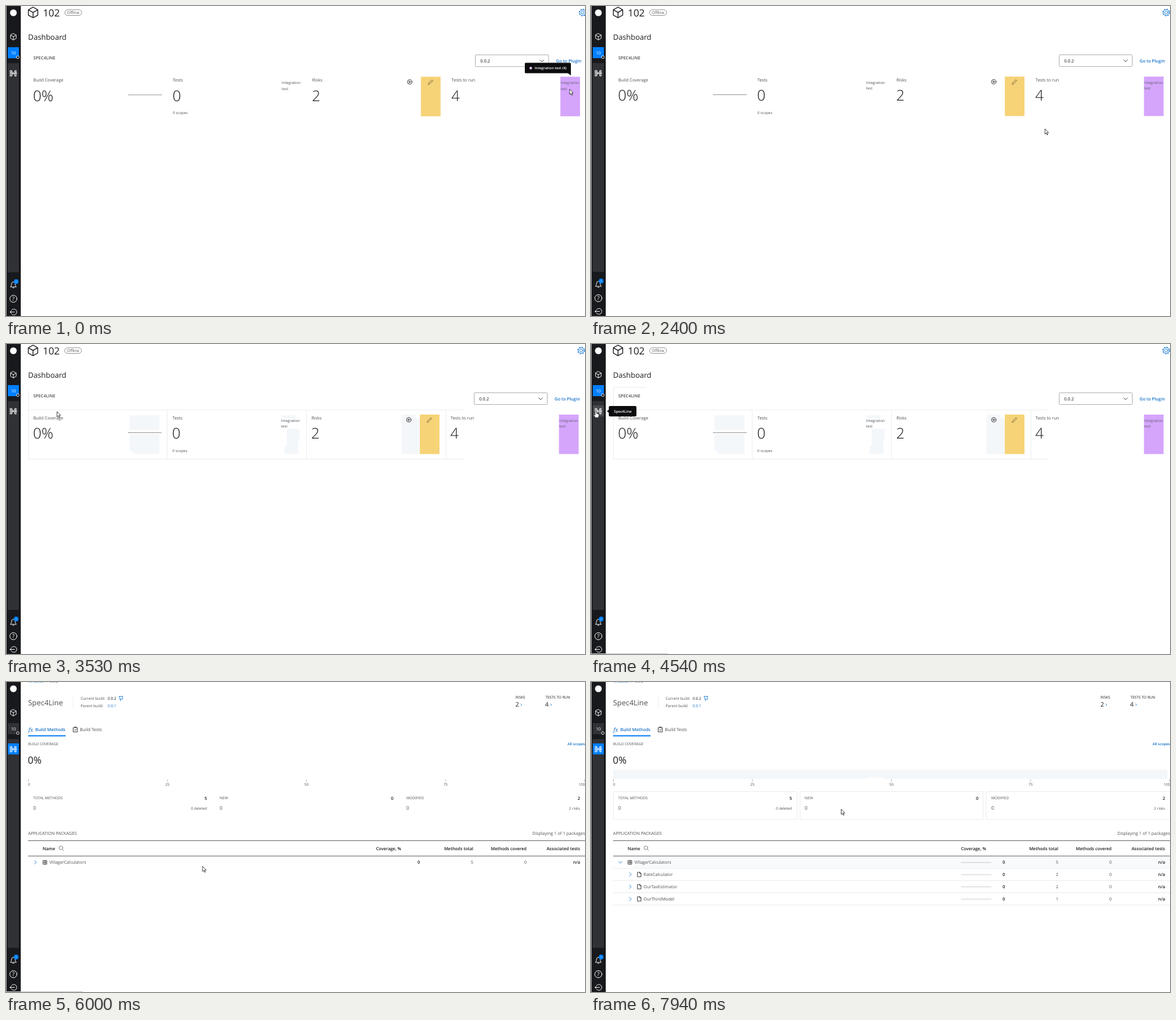
Animation of 943 by 505 pixels, one loop 8000 ms. Source, as an HTML page:

```html
<!DOCTYPE html>
<html lang="en">
<head>
<meta charset="utf-8">
<title>Dashboard</title>
<style>
  html, body { margin: 0; width: 100%; height: 100%; overflow: hidden; background: #fff; }
  svg { display: block; width: 100%; height: 100%; }
  text { font-family: "Open Sans", sans-serif; font-size: 7px; fill: #4c4f54; text-rendering: geometricPrecision; white-space: pre; }
  .small { font-size: 6px; }
  .mid { font-size: 6.2px; }
  .huge { font-size: 24px; font-weight: 300; fill: #1b191b; }
  .dark { fill: #1b191b; }
  .bold { font-weight: 600; }
  .blue { fill: #1570c8; }
  .white { fill: #fff; }
  .end { text-anchor: end; }
  .center { text-anchor: middle; }
  .line { fill: none; stroke: #eceeef; }
  .pale { fill: #f4f7fa; }
  .icon { fill: none; stroke: #fff; stroke-width: .9; stroke-linejoin: round; stroke-linecap: round; }
  .icon.ink { stroke: #2b2c30; }
  .icon.sky { stroke: #1f7fd6; }
</style>
</head>
<body>
<svg viewBox="0 0 943 505" preserveAspectRatio="none">
  <defs>
    <path id="cube" d="M0-5.2L4.6-2.7V2.7L0 5.2L-4.6 2.7V-2.7ZM-4.6-2.7L0 0L4.6-2.7M0 0V5.2"/>
    <path id="file" d="M-2.6-3.6H.8L2.7-1.6V3.6H-2.6ZM.8-3.6V-1.6H2.7"/>
    <g id="arrow"><path d="M0 0V8.6L2 6.8L3.4 10L4.8 9.4L3.4 6.3H6Z" fill="#fff" stroke="#222" stroke-width=".8"/></g>
    <g id="hand"><path d="M-1.2 7V1Q0-.6 1 1V4.2L4.4 5Q5.2 5.4 5 7L4.2 11H-.8L-3.4 7.4Q-3.6 5.8-2.2 6.2Z" fill="#fff" stroke="#222" stroke-width=".8"/></g>
    <g id="beam"><path d="M-1.8-4H1.8M0-4V4M-1.8 4H1.8" fill="none" stroke="#222" stroke-width=".9"/></g>
  </defs>

  <g id="view">
    <rect width="960" height="520" fill="#fff"/>

    <g data-on="0 5430">
      <use href="#cube" class="icon ink" stroke-width=".6" transform="translate(44 10.5) scale(1.65)"/>
      <text class="dark" x="60" y="16.6" style="font-size:16px">102</text>
      <rect x="95.5" y="6" width="27.5" height="9.4" rx="4.7" fill="none" stroke="#777" stroke-width=".8"/>
      <text class="center" x="109.2" y="12.8" style="font-size:6.3px">Offline</text>
      <g class="icon sky" transform="translate(936.8 10.6)">
        <circle r="4.7"/><circle r="2.4"/>
        <circle r="5.5" stroke-width="1.3" stroke-dasharray="2.1 2.22" stroke-linecap="butt"/>
      </g>
      <text class="dark" x="36" y="55" style="font-size:12.1px">Dashboard</text>
      <text class="bold" x="44.5" y="86.7">SPEC4LINE</text>
      <rect x="762.5" y="79.5" width="119" height="19" rx="1" fill="#fff" stroke="#9b9ea3" stroke-width=".8"/>
      <text class="dark" x="770.7" y="91.5">0.0.2</text>
      <path class="icon ink" d="M867.6 87.8l3 3l3-3"/>
      <text class="blue bold" x="893.6" y="91.5">Go to Plugin</text>

      <g data-on="2830 5430">
        <path class="line" d="M36.5 76V187.5H746M36.5 107.5H746M262.5 107.5V187M489.5 107.5V187M716.5 107.5V187"/>
        <path class="pale" d="M201 116H250V140H201ZM201 147H250V179H206V174H201ZM448 116H472V121H448ZM457 138H478V157H476V179H454V166H457ZM644 115H667V121H674V179H644Z"/>
        <path class="line" data-on="3810 5430" d="M36.5 76V70.5H90"/>
      </g>

      <text x="44.5" y="122.8">Build Coverage</text>
      <text class="huge" x="44" y="154.3">0%</text>
      <path d="M199 144.5H253" stroke="#333" stroke-width=".9" stroke-dasharray="1.3 1"/>
      <text x="271" y="122.8">Tests</text>
      <text class="huge" x="270.5" y="154.3">0</text>
      <text class="small" x="271" y="176">0 scopes</text>
      <text class="small" x="448" y="126.6">Integration</text>
      <text class="small" x="448" y="136.4">test</text>
      <text x="497.5" y="122.8">Risks</text>
      <text class="huge" x="497" y="154.3">2</text>
      <g class="icon ink" stroke-width=".7"><circle cx="656" cy="123.5" r="3.7"/><path d="M654.2 123.5h3.6m-1.8-1.8v3.6"/></g>
      <rect x="674" y="115" width="32" height="64.3" fill="#f7d377"/>
      <path class="icon" style="stroke:#665a3b;stroke-width:.8" d="M686 127.5l.6-2.2l5.4-5.3l1.6 1.5l-5.4 5.4Z"/>
      <text x="724" y="122.8">Tests to run</text>
      <text class="huge" x="723.5" y="154.3">4</text>
      <rect x="900.6" y="115" width="32" height="64.3" fill="#d5a5fc"/>
      <text class="small" x="901" y="126.6" fill-opacity=".8">Integration</text>
      <text class="small" x="901" y="136.4" fill-opacity=".8">test</text>
    </g>

    <g data-on="5430 8000">
      <text class="small blue" x="36" y="1">All builds</text>
      <text class="small" x="66" y="1">/  0.0.2</text>
      <text x="36" y="37.8" style="font-size:12px">Spec4Line</text>
      <path class="line" d="M109.5 24V41"/>
      <text class="mid" x="121.6" y="29">Current build:</text>
      <text class="mid dark" x="165.6" y="29">0.0.2</text>
      <path class="icon sky" d="M184.3 23.4h6l-1.4 2.3l1.4 2.3h-4.5M184.3 23.4l2.4 7.4"/>
      <text class="mid" x="121.6" y="41">Parent build:</text>
      <text class="mid blue" x="165.6" y="41">0.0.1</text>
      <text class="small dark" x="830" y="26.8">RISKS</text>
      <text class="dark" x="829.8" y="40.4" style="font-size:10px">2</text>
      <text class="small dark" x="878.6" y="26.8">TESTS TO RUN</text>
      <text class="dark" x="878" y="40.4" style="font-size:10px">4</text>
      <path class="icon sky" d="M838.7 35.6l1.4 1.4l-1.4 1.4M887.2 35.6l1.4 1.4l-1.4 1.4"/>

      <text class="blue" x="36.5" y="80.6" style="font:italic 9px 'Noto Serif',serif">fx</text>
      <text class="blue bold" x="47.8" y="80.3">Build Methods</text>
      <rect x="36" y="86.6" width="61" height="2" fill="#0a7ff0"/>
      <path class="icon ink" stroke-width=".7" d="M109.8 74.3h6.4v7h-6.4ZM111.5 73.3h3M111.4 78l1.2 1.2l2.2-2.6"/>
      <text x="120.3" y="80.3" style="font-size:7.2px">Build Tests</text>
      <text class="small" x="36" y="103">BUILD COVERAGE</text>
      <text class="small blue bold end" x="943" y="103">All scopes</text>
      <text class="dark" x="35.5" y="133" style="font-size:16px">0%</text>
      <path data-on="7660 8000" class="pale" d="M36 143H939V158H478V156H448V158H36Z"/>
      <g id="axis"></g>
      <g data-on="7660 8000" class="line">
        <path d="M36.5 178.5H335.5V224H36.5ZM340.5 178.5H638.5V224H340.5ZM643.5 178.5H943V224H643.5Z"/>
      </g>
      <g id="cards"></g>

      <text x="36" y="248.7">APPLICATION PACKAGES</text>
      <text class="end" x="943" y="248.7">Displaying 1 of 1 packages</text>
      <path d="M36 258.5H943M36 283.5H943" stroke="#55585c" stroke-width=".9"/>
      <g class="dark bold">
        <text class="dark" x="59.7" y="273.5">Name</text>
        <text class="dark" x="602.7" y="273.5">Coverage, %</text>
        <text class="dark end" x="761" y="273.5">Methods total</text>
        <text class="dark end" x="848" y="273.5">Methods covered</text>
        <text class="dark end" x="935" y="273.5">Associated tests</text>
      </g>
      <g class="icon" style="stroke:#777"><circle cx="89.4" cy="270.2" r="3"/><path d="M91.7 272.6l2 2"/></g>
      <rect data-on="7240 8000" x="69" y="287" width="874" height="15.5" fill="#f8fafb"/>
      <g id="rows"></g>
    </g>

    <g>
      <rect width="24" height="520" fill="#18191c"/>
      <rect width="1" height="520" fill="#a9abae"/>
      <rect x="2.5" y="93" width="18.5" height="340" fill="#303134"/>
      <circle cx="12" cy="11" r="5.5" fill="#fff"/>
      <use href="#cube" class="icon" x="12" y="50"/>
      <rect data-on="0 5430" x="3" y="67" width="18" height="18" fill="#007fff"/>
      <rect data-on="5430 8000" x="3" y="67" width="18" height="18" fill="#303134"/>
      <text class="white center" x="12" y="78.8">10</text>
      <circle cx="19.3" cy="83.3" r="2.2" fill="#18191c" stroke="#fff" stroke-width=".9"/>
      <rect data-on="4250 5430" x="3" y="100" width="18" height="18" fill="#47494d"/>
      <rect data-on="5430 8000" x="3" y="100" width="18" height="18" fill="#007fff"/>
      <path class="icon" d="M7 105h2.5v2H7ZM7 108.4h2.5v2H7ZM7 112h2.5v2H7ZM9.5 106l2 3.4l-2 3.5M9.5 109.4h6M12.5 109.4l2-3.4M12.5 109.4l2 3.5M14.7 105h2v2h-2ZM15.3 108.4h2v2h-2ZM14.7 112h2v2h-2Z"/>
      <path class="icon" d="M7.5 456.5Q9 455 9 452Q9 448.5 12 448.5Q15 448.5 15 452Q15 455 16.5 456.5ZM11 458.2h2"/>
      <circle cx="16.5" cy="448" r="3.9" fill="#007fff"/>
      <text class="white center" x="16.5" y="449.9" style="font-size:5px">1</text>
      <circle class="icon" cx="12" cy="476" r="5.8"/>
      <text class="white center" x="12" y="479.2" style="font-size:9px">?</text>
      <path class="icon" d="M9 494.5A4.8 4.8 0 1 1 9 500.5M6.5 497.5H14M8.5 495.7l-2 1.8l2 1.8"/>
    </g>
    <path data-on="4540 6160" d="M0 504.5H125" stroke="#c4c6c9"/>
  </g>

  <g data-on="0 840">
    <path d="M846.5 92.5H918.5Q920 92.5 920 94V113L915 109.5H846.5Q845 109.5 845 108V94Q845 92.5 846.5 92.5Z" fill="#0c0c0e"/>
    <circle cx="854.7" cy="101.2" r="2.1" fill="#e3c3fc"/>
    <text class="small bold white" x="861" y="103.3" style="font-size:5.8px">Integration test (4)</text>
  </g>
  <g data-on="4250 5710">
    <path d="M31 101H72Q74 101 74 103V116Q74 118 72 118H31Q29 118 29 116V112L26 109.5L29 107V103Q29 101 31 101Z" fill="#0c0c0e"/>
    <text class="small bold white center" x="51.7" y="111.7">Spec4Line</text>
  </g>
  <use id="cursor"/>
</svg>
<script>
  const LOOP = 8000;
  const find = id => document.getElementById(id);
  const label = (x, y, text, cls = '') => `<text x="${x}" y="${y}" class="${cls}">${text}</text>`;
  const chevron = (x, y, down) => `<path class="icon sky" stroke-width="1.1" d="M${x} ${y}${
    down ? 'm-2.8-1.3l2.8 2.8l2.8-2.8' : 'm-1.3-2.8l2.8 2.8l-2.8 2.8'}"/>`;

  find('axis').innerHTML = [0, 25, 50, 75, 100].map(n => {
    const x = 36.5 + n * 9.06;
    const [pos, cls] = n === 0 ? [36, ''] : n === 100 ? [943, 'end'] : [x, 'center'];
    return `<path d="M${x} 158.5v4" stroke="#a5a8ac" stroke-width=".8"/>` + label(pos, 168.8, n, cls + ' small');
  }).join('');

  find('cards').innerHTML = [
    ['TOTAL METHODS', 5, '0 deleted'], ['NEW', 0, ''], ['MODIFIED', 2, '2 risks']
  ].map(([title, total, note], i) => {
    const x = 44.3 + i * 303.8, right = 327.3 + i * 303.8;
    return label(x, 191, title, 'small') + label(right, 191.6, total, 'dark bold end') +
      `<text x="${x}" y="208.3" style="font-size:8px">0</text>` + label(right, 207.5, note, 'small end');
  }).join('');

  const meter = (y, from) => `<path data-on="${from} 8000" d="M602.5 ${y}H652" stroke="#d5d8db" stroke-width="1.3"/>`;
  const values = (y, total) => label(674.2, y, 0, 'dark bold end') + label(761, y, total, 'end') +
    label(848, y, 0, 'end') + label(935, y, 'n/a', 'dark bold end');

  const group = `<g data-on="5430 7660">${chevron(48, 293.8)}</g><g data-on="7660 8000">${chevron(48, 293.8, true)}</g>
    <path class="icon ink" d="M60.7 290.8h5.6v6h-5.6ZM63.5 290.8v6M60.7 293.8h5.6"/>` +
    label(70.7, 296.3, 'Village/Calculators') + meter(294, 6660) + values(296.3, 5);
  const items = [['RateCalculator', 2], ['OurTaxEstimator', 2], ['OurThirdModel', 1]].map(([name, total], i) => {
    const y = 313.6 + i * 19.9;
    return `<path class="line" d="M36 ${y - 10.1}H943M36 ${y + 9.9}H943"/>` + chevron(64, y) +
      `<use href="#file" class="icon ink" x="78.7" y="${y}"/>` +
      label(85.6, y + 2.5, name) + meter(y + .2, 7660) + values(y + 2.5, total);
  }).join('');
  find('rows').innerHTML = group + `<g data-on="7660 8000">${items}</g>`;

  // Start time, x, y, pointer shape
  const pointer = [
    [0, 918, 135.5, 'arrow'], [840, 880, 150, 'arrow'], [2400, 739.3, 200, 'arrow'],
    [2830, 700, 140, 'arrow'], [2970, 686, 150, 'arrow'], [3240, 668, 160, 'arrow'],
    [3530, 83, 110, 'arrow'], [3810, 50, 68, 'arrow'], [4090, 7, 92.5, 'arrow'],
    [4250, 8, 109, 'hand'], [5710, 60, 150, 'arrow'], [5840, 190, 250, 'arrow'],
    [6000, 320, 300, 'arrow'], [6160, 363, 322, 'arrow'], [6410, 371, 338, 'arrow'],
    [6660, 75, 292, 'beam'], [6940, 27, 290, 'arrow'], [7240, 47, 293, 'hand'],
    [7660, 70, 286, 'arrow'], [7940, 407.5, 207, 'arrow']
  ];

  const timed = [...document.querySelectorAll('[data-on]')].map(el => [el, ...el.dataset.on.split(' ').map(Number)]);
  const view = find('view'), cursor = find('cursor');

  function draw(now) {
    const t = now % LOOP;
    for (const [el, from, to] of timed) el.style.display = t >= from && t < to ? '' : 'none';
    view.setAttribute('transform', t < 2400 ? 'scale(1.0025 1.002)' : '');
    const [, x, y, shape] = pointer.findLast(step => step[0] <= t);
    cursor.setAttribute('href', '#' + shape);
    cursor.setAttribute('transform', `translate(${x} ${y})`);
  }

  const start = performance.now();
  function tick() {
    draw(performance.now() - start);
    requestAnimationFrame(tick);
  }
  draw(0);
  requestAnimationFrame(tick);
</script>
</body>
</html>
```
